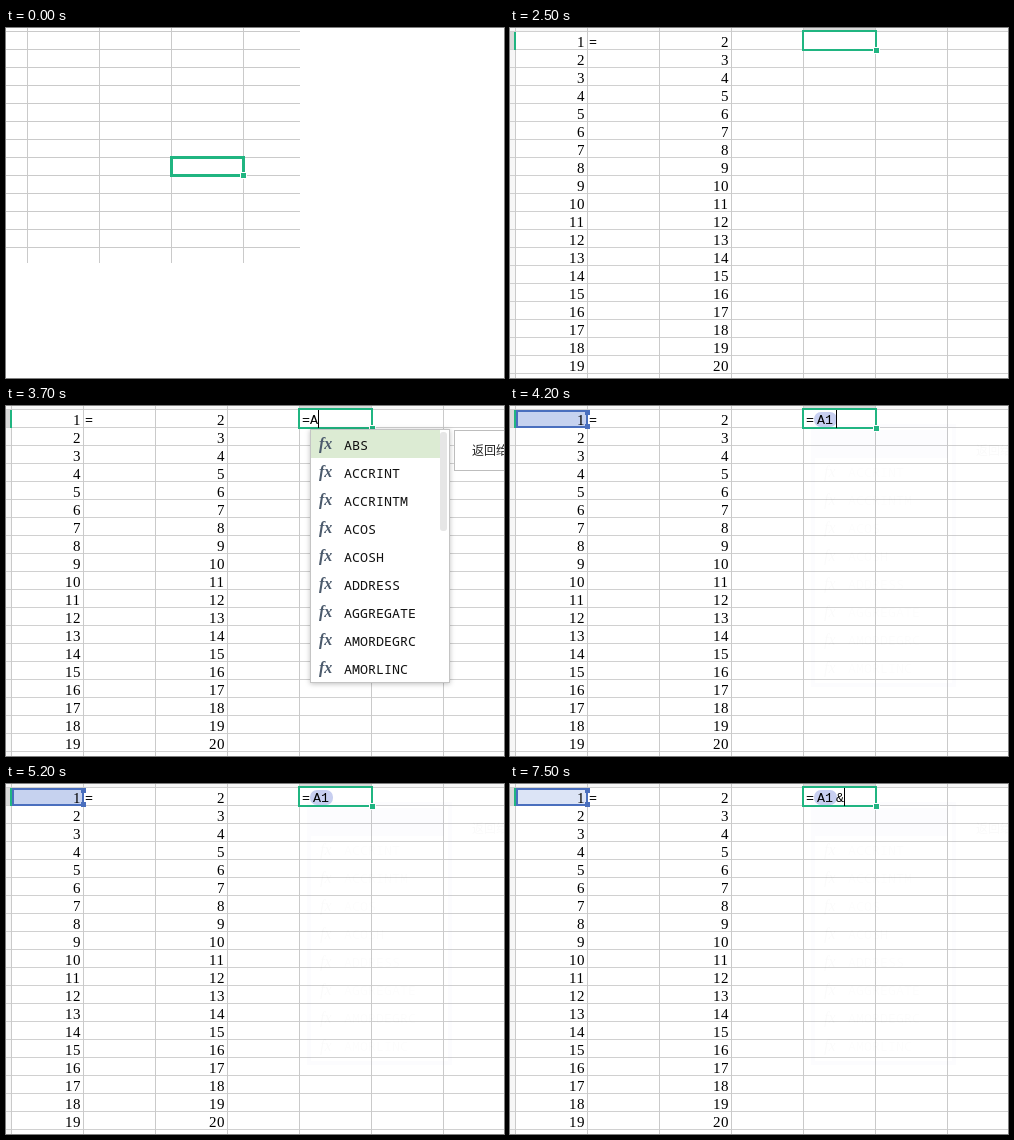
These frames come from a looping animation (498x350 px, 8000 ms). An HTML page with a canvas:

```html
<!DOCTYPE html>
<html lang="en">
<head>
<meta charset="utf-8">
<title>Spreadsheet formula entry</title>
<style>
html, body { margin: 0; width: 100%; height: 100%; overflow: hidden; background: #fff; }
canvas { display: block; }
</style>
</head>
<body>
<canvas id="stage" width="498" height="350"></canvas>
<script>
const ctx = document.getElementById('stage').getContext('2d');
const LOOP = 8000;
const GREEN = '#20b581', GRID = '#cacaca', ROW = '#d0d0d0', BLUE = '#4a6fbe', HEAD = '#dadada';
const DIGITS = '15px "Liberation Serif", serif';
const MONO = '13.333px "Liberation Mono", monospace';
const LIST = '300 13.333px "Noto Sans Mono", monospace';
const HINT = '12px "Noto Sans CJK SC", "Noto Sans CJK", sans-serif';
const NAMES = ['ABS', 'ACCRINT', 'ACCRINTM', 'ACOS', 'ACOSH',
  'ADDRESS', 'AGGREGATE', 'AMORDEGRC', 'AMORLINC'];

// [start, typed text, caret x or 0]
const STEPS = [
  [1500, '', 0], [2100, '', 296], [2500, '', 0],
  [2900, '=', 304], [3000, '=', 0], [3400, '=', 304],
  [3700, '=A', 312], [3900, '=A', 0],
  [4200, '=A1', 326], [4300, '=A1', 0], [4800, '=A1', 326], [5200, '=A1', 0], [5700, '=A1', 326],
  [5800, '=A1&', 334], [6200, '=A1&', 0], [6600, '=A1&', 334], [7100, '=A1&', 0], [7500, '=A1&', 334]
];

function box(x, y, w, h, color) {
  ctx.fillStyle = color;
  ctx.fillRect(x, y, w, h);
}

function round(x, y, w, h, r, color) {
  ctx.fillStyle = color;
  ctx.beginPath();
  ctx.roundRect(x, y, w, h, r);
  ctx.fill();
}

function outline(x, y, w, h, line, color) {
  ctx.strokeStyle = color;
  ctx.lineWidth = line;
  ctx.strokeRect(x + line / 2, y + line / 2, w - line, h - line);
}

function text(str, x, y, font, color = '#000') {
  ctx.font = font;
  ctx.fillStyle = color;
  ctx.fillText(str, x, y);
}

function grid(x0, w, h, rowColor) {
  for (let y = 3; y < h; y += 18) box(0, y, w, 1, rowColor);
  for (let x = x0; x < w; x += 72) box(x, 0, 1, h, GRID);
}

function selection(x, y, w, h, line) {
  const hx = x + w - line - 1, hy = y + h - line - 1;
  outline(x, y, w, h, line, GREEN);
  box(hx - 1, hy - 1, 7, 7, '#fff');
  box(hx, hy, 5, 5, GREEN);
}

function blankSheet() {
  grid(21, 294, 235, GRID);
  selection(164, 128, 75, 21, 3);
}

function sheet() {
  box(0, 0, 498, 3, '#f7f7f7');
  box(294, 0, 71, 2, HEAD);
  box(0, 0, 5, 350, '#f7f7f7');
  grid(5, 498, 350, ROW);
  box(0, 4, 4, 17, HEAD);
  box(4, 4, 2, 18, GREEN);
}

function number(n, right, y) {
  text(n, right - 8 * String(n).length, y, DIGITS);
}

function numbers() {
  ctx.letterSpacing = '0.5px';
  for (let i = 0; i < 19; i++) {
    number(i + 1, 75, 19 + 18 * i);
    number(i + 2, 219, 19 + 18 * i);
  }
  ctx.letterSpacing = '0px';
  text('=', 79, 18, MONO);
}

function reference(fill) {
  box(6, 4, 72, 18, fill);
  outline(6, 4, 72, 18, 2, BLUE);
  for (const y of [4, 18]) box(75, y, 5, 5, BLUE);
}

function popup() {
  ctx.save();
  ctx.shadowColor = 'rgba(0,0,0,.25)';
  ctx.shadowBlur = 5;
  ctx.shadowOffsetY = 1;
  box(304, 23, 140, 254, '#fff');
  ctx.restore();
  outline(304, 23, 140, 254, 1, '#c4c4c4');
  box(305, 24, 129, 28, '#dcebd3');
  round(434, 26, 7, 99, 3, '#e6e6e6');
  NAMES.forEach((name, i) => {
    text('fx', 313, 43 + 28 * i, 'italic bold 16px "Liberation Serif", serif', '#4b5a6c');
    text(name, 338, 44 + 28 * i, LIST, '#111');
  });
  box(448, 24, 60, 41, '#fff');
  outline(448, 24, 60, 41, 1, '#bdbdbd');
  text('返回给', 466, 49, HINT, '#222');
}

// faint trace of the closed list
function trace() {
  const tint = 'rgba(60,90,190,.015)';
  outline(301, 18, 145, 263, 4, tint);
  box(305, 24, 133, 28, tint);
  NAMES.slice(1).forEach((name, i) => {
    text('fx', 314, 71 + 28 * i, 'italic 16px "Liberation Serif", serif', 'rgba(0,0,0,.02)');
    text(name, 338, 71 + 28 * i, LIST, 'rgba(0,0,0,.012)');
  });
  text('返回给', 466, 49, HINT, 'rgba(0,0,0,.025)');
}

function draw(t) {
  box(0, 0, 498, 350, '#fff');
  if (t < STEPS[0][0]) return blankSheet();
  const [, typed, caret] = STEPS.findLast(step => step[0] <= t);
  const linked = typed.length > 2;

  sheet();
  if (linked) reference(typed.length > 3 ? '#dce4f6' : '#c6d2ef');
  numbers();
  box(294, 4, 72, 17, '#fff');
  selection(292, 2, 75, 21, 2);

  if (linked) {
    round(304, 6, 23, 15, 7, '#c8cff0');
    text('=', 296, 18, MONO);
    text('A1', 307, 18, MONO);
    text(typed.slice(3), 326, 18, MONO);
    trace();
  } else {
    text(typed, 296, 18, MONO);
  }
  if (caret) box(caret, 4, 1, 18, '#000');
  if (typed === '=A') popup();
}

const start = performance.now();
function tick() {
  draw((performance.now() - start) % LOOP);
  requestAnimationFrame(tick);
}
tick();
</script>
</body>
</html>
```
